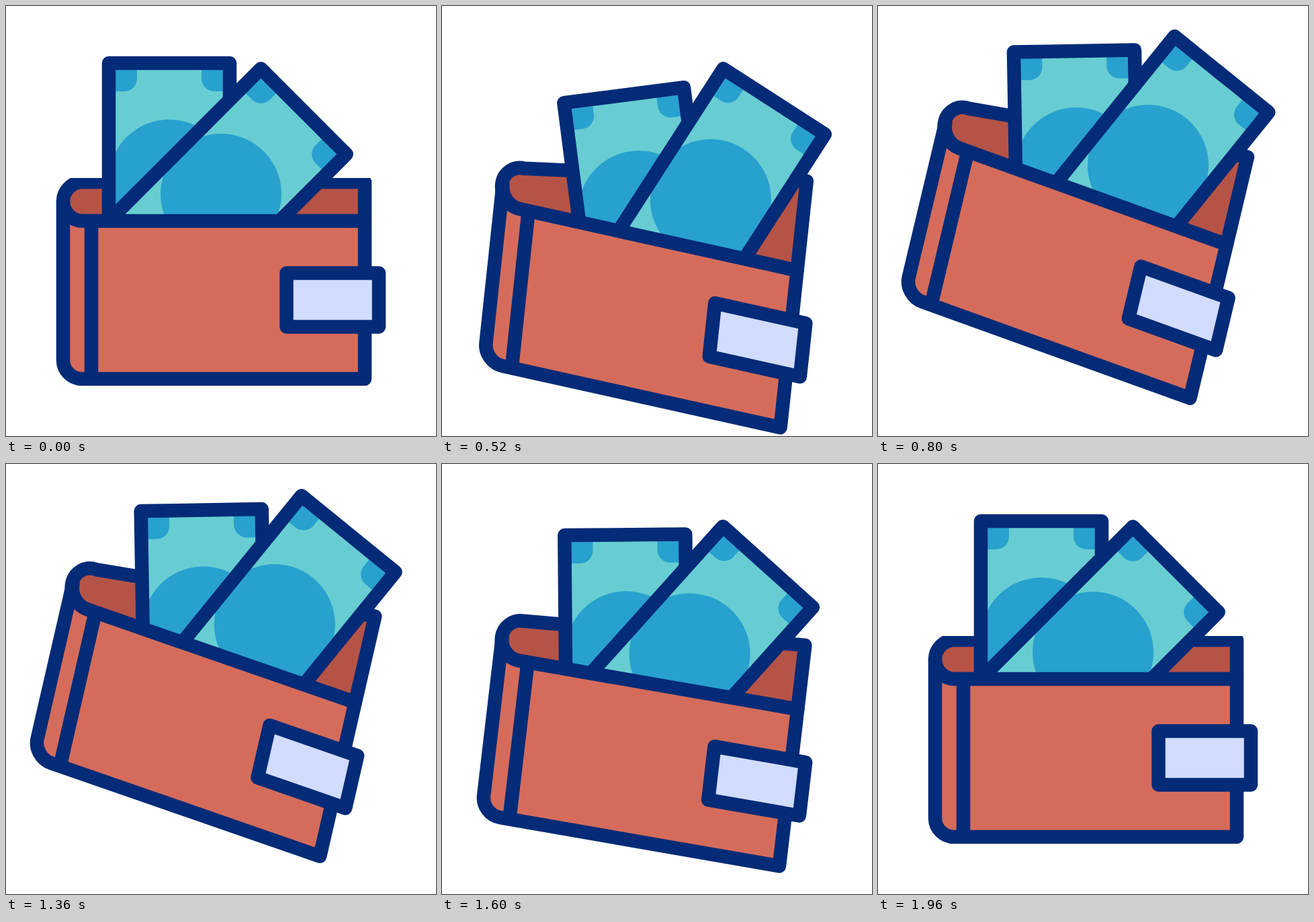
Recreate the animation shown at these times as an HTML page. Size 640 by 640 pixels, loop 2000 ms.

```html
<!DOCTYPE html>
<html lang="en">
<head>
<meta charset="utf-8">
<title>Wallet</title>
<style>
  html, body { margin: 0; height: 100%; overflow: hidden; background: #fff; }
  svg { display: block; width: 100%; height: 100%; }
  .line { stroke: #032b77; stroke-width: 20.5; stroke-linejoin: round; vector-effect: non-scaling-stroke; }
</style>
</head>
<body>
<svg viewBox="0 0 640 640">
  <defs>
    <clipPath id="rest"><rect y="256" width="640" height="384"/></clipPath>
    <g id="note">
      <rect x="-90" y="-174" width="180" height="348" fill="#67cdd2"/>
      <g fill="#28a1ce">
        <circle r="90"/>
        <path id="corner" d="M-90-132h23a19 19 0 0 0 19-19v-23h-42z"/>
        <use href="#corner" transform="scale(-1 1)"/>
      </g>
      <rect class="line" x="-90" y="-174" width="180" height="348" fill="none"/>
    </g>
  </defs>
  <g id="backClip"><g class="wallet"><path id="back" class="line" fill="#b65347"/></g></g>
  <use id="note1" href="#note"/>
  <use id="note2" href="#note"/>
  <g class="wallet">
    <path class="line" fill="#d56c5b" d="M114 320H534V555H113A28 28 0 0 1 85 527V291A29 29 0 0 0 114 320Z"/>
    <path class="line" d="M127 320V555"/>
    <rect id="tab" class="line" x="417.5" width="137.5" height="80" fill="#d1dcfe"/>
  </g>
</svg>
<script>
const $ = id => document.getElementById(id);
const wallets = document.querySelectorAll('.wallet');
const LOOP = 2000, STEP = 40;

const span = (t, a, b) => Math.min(1, Math.max(0, (t - a) / (b - a)));
const smooth = u => u * u * (3 - 2 * u);
const swing = u => Math.sin(Math.PI * u) ** 2;

// Cubic Bezier easing, solved by bisection
function ease(u, x1, y1, x2, y2) {
  const curve = (s, a, b) => 3 * a * s * (1 - s) ** 2 + 3 * b * s * s * (1 - s) + s ** 3;
  let lo = 0, hi = 1;
  for (let i = 0; i < 24; i++) {
    const mid = (lo + hi) / 2;
    if (curve(mid, x1, x2) < u) lo = mid; else hi = mid;
  }
  return u <= 0 ? 0 : u >= 1 ? 1 : curve(lo, y1, y2);
}

// turn: wallet tilt, open: skew and gape, slide: note travel,
// dips: downward swing of wallet and notes, sways: extra note rotation
function pose(t) {
  if (t < 1320) {
    const open = smooth(span(t, 205, 525));
    const early = swing(span(t, 210, 790)), late = swing(span(t, 230, 787));
    return {
      turn: ease(span(t, 200, 800), .4, .05, .8, .98),
      open, slide: open,
      dips: [46 * late, 65 * early, 51.5 * late],
      sways: [-6.4 * early, -6.1 * late]
    };
  }
  const q = 1 - ease(span(t, 1320, 1960), .28, .1, .6, .97);
  const arch = Math.max(0, Math.sin(Math.PI * q)) ** 1.5;
  return { turn: q, open: q, slide: q ** .75, dips: [28 * arch, 31 * arch, 28 * arch], sways: [0, 0] };
}

function place(id, x, y, angle, sway) {
  $(id).setAttribute('transform', `translate(${x + sway / 3} ${y}) rotate(${angle + sway})`);
}

function draw(t) {
  const { turn, open, slide, dips, sways } = pose(t);
  const move = `translate(${330.5 - 31.5 * turn} ${437.5 - 37.5 * turn + dips[0]})
    rotate(${13.4 * turn}) skewY(${6.4 * open}) translate(-330.5 -437.5)`;
  wallets.forEach(w => w.setAttribute('transform', move));
  $('back').setAttribute('d', `M114 320A29 29 0 0 1 114 ${262 - 3 * open}L534 ${262 - 76 * open}V320Z`);
  $('backClip').setAttribute('clip-path', open < .01 ? 'url(#rest)' : 'none');
  $('tab').setAttribute('y', 397.5 - 3.2 * open);
  place('note1', 243 + 52 * slide, 259 - 18 * slide + dips[1], -open, sways[0]);
  place('note2', 320 + 82 * slide, 280 - 43 * slide + dips[2], 45 - 6.1 * open, sways[1]);
}

const start = performance.now();
function tick() {
  const t = (performance.now() - start) % LOOP;
  draw(Math.floor(t / STEP) * STEP);
  requestAnimationFrame(tick);
}
tick();
</script>
</body>
</html>
```
